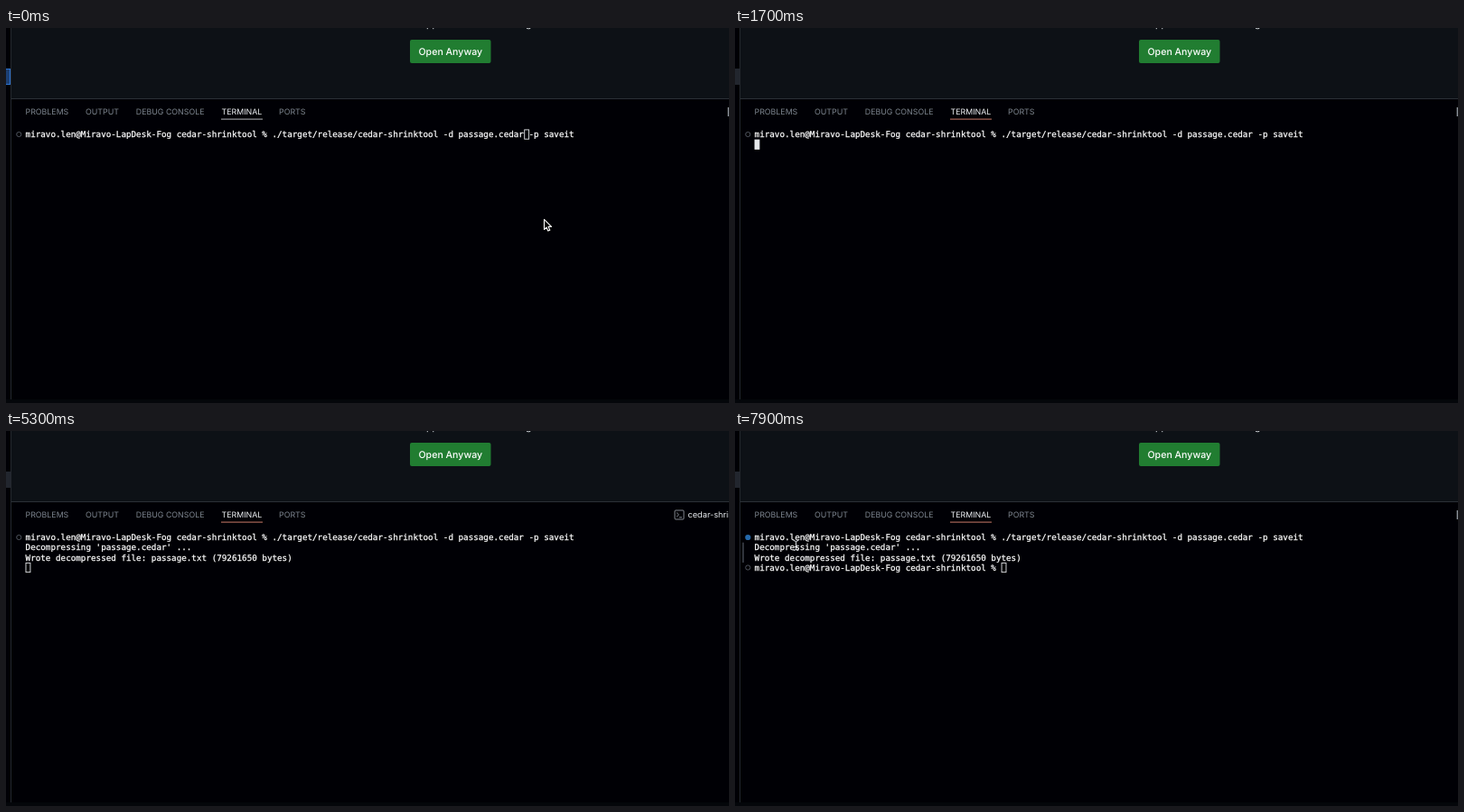
Write an HTML page that moves like this. It is 800 px wide and 416 px high and loops after 8000 ms.

```html
<!DOCTYPE html>
<html lang="en">
<head>
<meta charset="utf-8">
<title>Terminal session</title>
<style>
html, body { margin: 0; width: 100%; height: 100%; overflow: hidden; background: #000005; }
svg { display: block; }
text { font-family: Inter, "Open Sans", sans-serif; text-rendering: geometricPrecision; white-space: pre; }
.tabs { font-size: 8.83px; fill: #7d858f; }
#rows text { font: 9.257px "DejaVu Sans Mono", monospace; fill: #fff; stroke: #fff; stroke-width: .25px; }
.mark { fill: none; stroke: #50555d; }
</style>
</head>
<body>
<svg width="800" height="416" viewBox="0 0 800 416">
  <rect width="800" height="416" fill="#000005"/>
  <rect x="5" width="795" height="78" fill="#0d1116"/>
  <rect x="5" width="1" height="416" fill="#24282e"/>
  <rect x="6" y="78" width="794" height="1" fill="#2b3036"/>
  <rect y="412" width="800" height="4" fill="#04060a"/>

  <rect id="itemIdle" y="45" width="5" height="18" fill="#22262e"/>
  <rect id="itemFocus" x="-3" y="45.5" width="7.5" height="17" fill="#1c3f73" stroke="#2f74d0"/>

  <g font-size="10.6" fill="#e2e6ea">
    <text x="465" y="-.6">pp</text>
    <text x="575" y="-.6">g</text>
  </g>
  <rect x="447" y="13" width="89.5" height="26" rx="2" fill="#217d31"/>
  <text x="456.5" y="30.4" font-size="10.6" font-weight="500" fill="#fff">Open Anyway</text>

  <g class="tabs">
    <text x="21.5" y="95.8">PROBLEMS</text>
    <text x="88" y="95.8">OUTPUT</text>
    <text x="143.8" y="95.8">DEBUG CONSOLE</text>
    <text x="238.5" y="95.8" fill="#f0f3f6">TERMINAL</text>
    <text x="302" y="95.8">PORTS</text>
  </g>
  <rect id="underline" x="238" y="100.6" width="46" height="1"/>

  <rect id="sliver" x="798.6" y="88" width="1.4" height="10" fill="#8b9199"/>
  <g id="title">
    <rect x="740" y="88" width="10" height="10" rx="1" fill="none" stroke="#90969e" stroke-width=".9"/>
    <path d="M742 90.5l2.5 2.4-2.5 2.4M745 95.8h3" fill="none" stroke="#90969e" stroke-width=".9"/>
    <text x="754.5" y="96.2" font-size="9.2" fill="#e8ebef">cedar-shrinktool</text>
  </g>

  <rect id="bar" x="8" width="2" fill="#30343b"/>
  <circle id="mark" cx="14.3" cy="118" r="2.6" class="mark"/>
  <circle id="done" cx="14.3" cy="118" r="3.1" fill="#2469ab"/>
  <circle id="nextMark" cx="14.3" cy="151.5" r="2.6" class="mark"/>
  <g id="rows"></g>
  <rect id="caret" width="4.9" height="10.3" stroke="#e6e8eb" stroke-width=".9"/>

  <path id="arrow" d="M0 0V11.2L2.6 8.9 4.3 12.8 6.3 11.9 4.6 8.1H8Z" fill="#000" stroke="#fff" stroke-width="1.1" stroke-linejoin="round"/>
  <g id="beam" fill="none" stroke-linecap="round">
    <path id="beamShape" d="M-2.4-5.5Q0-5.5 0-3.5Q0-5.5 2.4-5.5M0-3.5V3.5M-2.4 5.5Q0 5.5 0 3.5Q0 5.5 2.4 5.5M-1.3 1.5H1.3" stroke="#dcdfe3"/>
  </g>
</svg>
<script>
const LOOP = 8000, LEFT = 21.6, TOP = 112.5, CELL = 5.573, ROW = 11.15;
const $ = id => document.getElementById(id);
const show = (id, on) => $(id).style.display = on ? '' : 'none';
const place = (id, x, y) => $(id).setAttribute('transform', `translate(${x} ${y})`);
const set = (id, attrs) => {
  for (const name in attrs) $(id).setAttribute(name, attrs[name]);
};

const prompt = 'miravo.len@Miravo-LapDesk-Fog cedar-shrinktool % ';
const lines = [ // [time shown, text]
  [0, prompt + './target/release/cedar-shrinktool -d passage.cedar -p saveit'],
  [1800, "Decompressing 'passage.cedar' ..."],
  [5300, 'Wrote decompressed file: passage.txt (79261650 bytes)'],
  [5500, prompt]
];
const rows = lines.map(([, text], i) => {
  const row = document.createElementNS('http://www.w3.org/2000/svg', 'text');
  row.setAttribute('x', LEFT);
  row.setAttribute('y', TOP + 8.7 + i * ROW);
  row.textContent = text;
  return $('rows').appendChild(row);
});

// Text caret: [time, column, row, solid]
const carets = [
  [0, 99, 0, false], [700, 99, 0, true], [1700, 0, 1, true], [1800, 0, 2, true],
  [1900, 0, 2, false], [5300, 0, 3, false], [5500, 49, 3, false]
];
// Pointer over the terminal text: [time, x, y]
const beams = [
  [500, 646, 115], [600, 645, 118], [7700, 634, 130], [7800, 320, 147], [7900, 67.5, 127]
];
const latest = (list, t) => list.filter(entry => entry[0] <= t).pop();

function draw(t) {
  t = Math.floor(t / 100) * 100;
  rows.forEach((row, i) => row.style.display = t >= lines[i][0] ? '' : 'none');

  const [, column, line, solid] = latest(carets, t);
  set('caret', {
    x: LEFT + .4 + column * CELL, y: TOP + .4 + line * ROW,
    fill: solid ? '#e6e8eb' : 'none'
  });

  show('itemFocus', t < 700);
  show('itemIdle', t >= 700);
  set('underline', { fill: t < 700 ? '#b5b7ba' : '#cb7a68' });
  const titled = t >= 1900 && t < 5600;
  show('title', titled);
  show('sliver', !titled);
  show('mark', t < 5500);
  show('done', t >= 5500);
  show('nextMark', t >= 5500);

  show('arrow', t < 500);
  const p = Math.min(t / 400, 1), ease = p * p * (3 - 2 * p);
  place('arrow', 595.5 + 51 * ease, 212.3 - 103 * ease);

  const hover = t >= 500 && t < 1400 || t >= 7700;
  show('beam', hover);
  show('bar', hover);
  if (hover) {
    const [, x, y] = latest(beams, t);
    place('beam', x, y);
    set('bar', t < 1400 ? { y: 112.5, height: 11.2 } : { y: 123.7, height: 22.3 });
  }
}

const start = performance.now();
function tick() {
  draw((performance.now() - start) % LOOP);
  requestAnimationFrame(tick);
}
tick();
</script>
</body>
</html>
```
